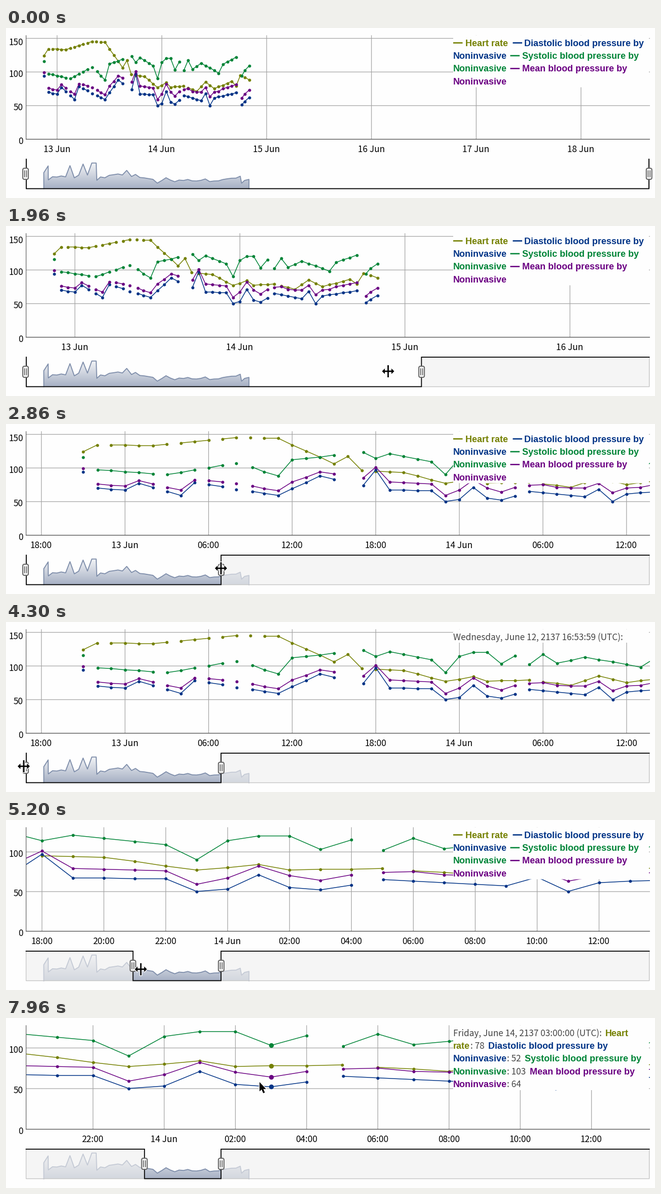
Recreate the animation shown at these times as a matplotlib script. Size 1280 by 337 pixels, loop 8 s.

```python
import itertools

import numpy as np
import matplotlib.pyplot as plt
from matplotlib.animation import FuncAnimation
from matplotlib.patches import FancyBboxPatch, Polygon, Rectangle

W, H, DPI = 1280, 337, 100
LOOP_MS, STEP_MS = 8000, 40
PT = 72 / DPI
X0, X1, TOP, BASE = 39.6, 1268.6, 15, 220.2
SEL_TOP, SEL_BASE = 260, 318.5
FIRST_HOUR, SEL_SCALE = -7.1, 8.611      # hours count from 13 Jun 00:00
BACKGROUND = "#fefefe"
GRID = "#a4a4a4"
OLIVE, BLUE, GREEN, PURPLE = "#748000", "#003386", "#008437", "#6a0082"

# Hours whose heart rate and pressures sit in separate rows, with the delay.
SPLITS = {-2: .04, 3: .02, 6: 0, 8: 0, 9: .15, 17: .1, 29: .02, 42: .3}
NO_PRESSURE = 16

# Turning points of each signal: hour, reading.
HEART = [(-3, 124), (-2, 134), (2, 133), (8, 145), (11, 144), (15, 106), (16, 117),
         (17, 96), (20, 93), (23, 77), (25, 84), (26, 77), (29, 79), (32, 71),
         (34, 85), (36, 75), (40, 86), (41, 79), (42, 95), (44, 88)]
SYSTOLIC = [(-3, 116), (-2, 97), (3, 90), (8, 107), (11, 88), (12, 112), (17, 123),
            (18, 114), (19, 121), (22, 109), (23, 90), (24, 114), (25, 120), (26, 120),
            (27, 103), (28, 115), (29, 102), (30, 117), (31, 104), (33, 113), (37, 98),
            (38, 111), (41, 122), (42, 94), (44, 109)]
DIASTOLIC = [(-3, 94), (-2, 70), (0, 67), (1, 77), (4, 59), (5, 78), (11, 59), (14, 88),
             (17, 74), (18, 97), (19, 67), (22, 66), (23, 50), (24, 53), (25, 71),
             (26, 55), (27, 52), (29, 65), (33, 57), (34, 68), (35, 50), (36, 61),
             (41, 69), (42, 51), (44, 62)]

# Cursor moves: start and end in ms, place reached, ease-out power.
CURSOR_START = (1276, 334)
MOVES = [(530, 1330, 1266, 291, 1), (1560, 2860, 424, 286, 2.55),
         (3230, 3330, 338, 302, 1), (3600, 4060, 29, 286, 1),
         (4200, 4280, 35, 286, 1), (4630, 5210, 270, 296, 1),
         (5660, 5860, 176, 306, 1), (5860, 6460, 386, 252, 1),
         (6500, 6800, 387, 137, 1), (7160, 7920, 500, 127, 1)]

ARROW = .92 * np.array([(0, 0), (0, 20), (4.5, 16), (8, 24), (11.5, 22.5), (8.2, 15),
                        (14, 15)])
QUARTER = np.array([(12, 0), (6.5, 5.5), (6.5, 1.4), (1.4, 1.4), (1.4, 12)])
RESIZE = np.vstack([QUARTER, QUARTER[::-1] * (-1, 1), -QUARTER, QUARTER[::-1] * (1, -1)])


def readings(keys, hours):
    return np.rint(np.interp(hours, *zip(*keys)))


def make_series(color, hours, times, values, gap_shift):
    gaps = np.flatnonzero(np.isin(hours, list(SPLITS))) + gap_shift
    return dict(color=color, hours=hours, times=times, values=values,
                line=(np.insert(times, gaps, np.nan), np.insert(values, gaps, np.nan)))


heart_hours = np.arange(-3., 45)
bp_hours = heart_hours[heart_hours != NO_PRESSURE]
bp_times = bp_hours + [SPLITS.get(h, 0) for h in bp_hours]
systolic, diastolic = readings(SYSTOLIC, bp_hours), readings(DIASTOLIC, bp_hours)
mean_pressure = np.rint(diastolic + .23 * (systolic - diastolic))

SERIES = [make_series(OLIVE, heart_hours, heart_hours, readings(HEART, heart_hours), 1)]
SERIES += [make_series(color, bp_hours, bp_times, values, 0) for color, values in
           ((BLUE, diastolic), (GREEN, systolic), (PURPLE, mean_pressure))]

plt.rcParams["path.snap"] = False
fig = plt.figure(figsize=(W / DPI, H / DPI), dpi=DPI, facecolor=BACKGROUND)
ax = fig.add_axes((0, 0, 1, 1))
artists = []
order = itertools.count(10)


def ease(t, start, end, power=1):
    return 1 - (1 - np.clip((t - start) / (end - start), 0, 1)) ** power


def cursor_at(t):
    place = np.array(CURSOR_START, float)
    for start, end, x, y, power in MOVES:
        place += (np.array((x, y)) - place) * ease(t, start, end, power)
    return place


def keep(artist):
    artist.set_zorder(next(order))
    artists.append(artist)
    return artist


def stroke(xs, ys, color, width=1.25, **style):
    return keep(ax.plot(xs, ys, color=color, lw=width * PT, **style)[0])


def dots(xs, ys, color, diameter):
    stroke(xs, ys, color, 0, ls="none", marker="o", ms=diameter * PT, mew=0)


def box(x, y, x2, y2, color, alpha=1):
    keep(ax.add_patch(Rectangle((x, y), x2 - x, y2 - y, fc=color, ec="none", alpha=alpha)))


def label(x, y, text, color="black", bold=False, ha="left"):
    keep(ax.text(x, y, text, color=color, ha=ha, va="baseline",
                 family="Liberation Sans" if bold else "Noto Sans CJK JP",
                 fontsize=(18 if bold else 17.2) * PT, weight="bold" if bold else "normal"))


def draw_overview():
    points = []
    for hour in heart_hours:
        heart, *pressures = [s["values"][s["hours"] == hour] for s in SERIES]
        if hour in SPLITS or hour == NO_PRESSURE:
            points.append((hour, heart.mean()))
            if SPLITS.get(hour, 0) > .03:
                points.append((hour + SPLITS[hour], np.mean(pressures)))
        else:
            points.append((hour, np.mean([heart, *pressures])))
    hours, means = np.array(points).T
    xs = X0 - .4 + (hours - FIRST_HOUR) * SEL_SCALE
    ys = 308 - .524 * (means - 68)
    xs, ys = np.r_[xs[0], xs, xs[-1]], np.r_[SEL_BASE, ys, SEL_BASE]
    shades = np.linspace((1, 1, 1), (.655, .694, .769), 64)[:, None]
    fill = ax.imshow(shades, extent=(xs[0], xs[-1], SEL_BASE, SEL_TOP), aspect="auto",
                     interpolation="bilinear", zorder=1)
    fill.set_clip_path(Polygon(np.c_[xs, ys], transform=ax.transData))
    ax.plot(xs, ys, color="#808fab", lw=1.9 * PT, zorder=2)
    ax.plot([X0, X0, X1, X1], [SEL_TOP, SEL_BASE, SEL_BASE, SEL_TOP],
            color="gray", lw=1.25 * PT, zorder=3)


def draw_chart(left, right, hover):
    scale = (X1 - X0) / (right - left)

    def to_x(hours):
        return X0 + (hours - left) * scale

    peak = 0
    for s in SERIES:
        first = max(np.searchsorted(s["times"], left) - 1, 0)
        last = np.searchsorted(s["times"], right) + 1
        peak = max(peak, s["values"][first:last].max())
    unit = 193.3 / peak

    for value in range(0, 151, 50):
        y = BASE + .3 - value * unit
        if y < TOP:
            continue
        if value:
            stroke([X0, X1 + .8], [y, y], GRID)
        label(34, max(y + 3.2, 28) + 6.3, str(value), ha="right")

    step = next(s for s in (1, 2, 6, 24) if s * scale >= 87.5 or s == 24)
    for hour in np.arange(np.ceil(left / step) * step, right, step):
        x = to_x(hour)
        stroke([x, x], [TOP, BASE], GRID)
        day, clock = divmod(int(hour), 24)
        text = f"{clock:02d}:00" if clock else f"{13 + day} Jun"
        label(min(x - .4, 1241), 245.7, text, ha="center")

    frame = Rectangle((X0, TOP), X1 - X0 + .9, BASE - TOP, transform=ax.transData)
    for s in SERIES:
        xs, ys = s["line"]
        stroke(to_x(xs), BASE - ys * unit, s["color"], 1.5).set_clip_path(frame)
        shown = (s["times"] >= left) & (s["times"] <= right)
        dots(to_x(s["times"][shown]), BASE - s["values"][shown] * unit, s["color"], 6)
        if hover is not None:
            at = s["hours"] == hover
            dots(to_x(s["times"][at]), BASE - s["values"][at] * unit, s["color"], 9.4)

    stroke([X0, X0], [TOP, BASE], "#666666")
    stroke([X0, X1 + .8], [BASE + .3] * 2, "#444444")


def legend_box(lines):
    box(882, TOP - .5, 1268, 15.5 + 25.5 * lines, BACKGROUND)


def legend_text(x, line, text, color="#444444", bold=True):
    label(x, 35.6 + 25.4 * line, text, color, bold)


NAMES = [("Diastolic blood pressure by", BLUE), ("Systolic blood pressure by", GREEN),
         ("Mean blood pressure by", PURPLE)]


def legend_dash(x, line, color):
    y = 29.5 + 25.4 * line
    stroke([x, x + 18.5], [y, y], color, 2.6, solid_capstyle="butt")


def draw_key_legend():
    legend_box(4)
    legend_dash(882, 0, OLIVE)
    legend_text(905.5, 0, "Heart rate", OLIVE)
    for line, (name, color) in enumerate(NAMES):
        x = 994.5 if line else 999.5
        legend_dash(x, line, color)
        legend_text(x + 23, line, name, color)
        legend_text(882, line + 1, "Noninvasive", color)


def draw_value_legend(hour):
    values = [int(s["values"][s["hours"] == hour][0]) for s in SERIES]
    legend_box(5)
    legend_text(882, 0, f"Friday, June 14, 2137 {hour - 24:02d}:00:00 (UTC):", bold=False)
    legend_text(1181.5, 0, "Heart", OLIVE)
    legend_text(882, 1, "rate", OLIVE)
    end = 916
    for line, value in enumerate(values, 1):
        legend_text(end, line, f": {value}", bold=False)
        if line < 4:
            name, color = NAMES[line - 1]
            legend_text(end + 15 + 9.8 * len(str(value)), line, name, color)
            legend_text(882, line + 1, "Noninvasive", color)
        end = 988.5


def draw_selector(left_px, right_px):
    lx, rx = max(left_px - .8, 40), right_px - .6
    path = [(lx, SEL_TOP), (lx, SEL_BASE), (rx, SEL_BASE), (rx, SEL_TOP)]
    if left_px > X0 + 1:
        box(X0 - .7, SEL_TOP, lx, SEL_BASE + .7, "#f0f0f0", .62)
        path.insert(0, (X0, SEL_TOP))
    if right_px < X1 - 1:
        box(rx, SEL_TOP, X1 + .7, SEL_BASE + .7, "#f0f0f0", .62)
        path.append((X1, SEL_TOP))
    stroke(*zip(*path), "black", 1.8, solid_joinstyle="miter")
    for x in (left_px - 1, right_px - .3):
        keep(ax.add_patch(FancyBboxPatch(
            (x - 5.5, 278), 11, 22, boxstyle="round,pad=0,rounding_size=3",
            fc="#f5f5f5", ec="#666666", lw=2 * PT)))
        for dx in (-1.9, 1.9):
            stroke([x + dx] * 2, [283, 295], "#555555", 1.5)


def draw_cursor(x, y, resizing):
    shape = (RESIZE if resizing else ARROW) + (x, y)
    keep(ax.add_patch(Polygon(shape, fc="white", ec="white", lw=2.6 * PT)))
    keep(ax.add_patch(Polygon(shape, fc="black", ec="none")))


def draw(frame):
    global order
    order = itertools.count(10)
    while artists:
        artists.pop().remove()

    t = frame * STEP_MS
    left_px = X0 + (274 - X0) * ease(t, 4640, 5260)
    right_px = X1 + (424.7 - X1) * ease(t, 1603, 2860, 2.27)
    left, right = (FIRST_HOUR + (px - X0) / SEL_SCALE for px in (left_px, right_px))
    cx, cy = cursor_at(t)
    hover = None
    if cy < 258:
        hover = int(round(left + (cx - X0) / (X1 - X0) * (right - left)))

    draw_chart(left, right, hover)
    if hover is not None:
        draw_value_legend(hover)
    elif 4040 <= t <= 4630:
        legend_box(1)
        legend_text(882, 0, "Wednesday, June 12, 2137 16:53:59 (UTC):", bold=False)
    else:
        draw_key_legend()
    draw_selector(left_px, right_px)

    if t >= 530:
        dragging = 1560 <= t <= 2860 or 4630 <= t <= 5240
        near = min(abs(cx - left_px), abs(cx - right_px)) < 14 and 276 < cy < 302
        draw_cursor(cx, cy, dragging or near)
    return artists


draw_overview()
ax.set(xlim=(0, W), ylim=(H, 0), autoscale_on=False)
ax.axis("off")
animation = FuncAnimation(fig, draw, frames=LOOP_MS // STEP_MS, interval=STEP_MS,
                          repeat=True, repeat_delay=0, blit=False)
plt.show()
```
